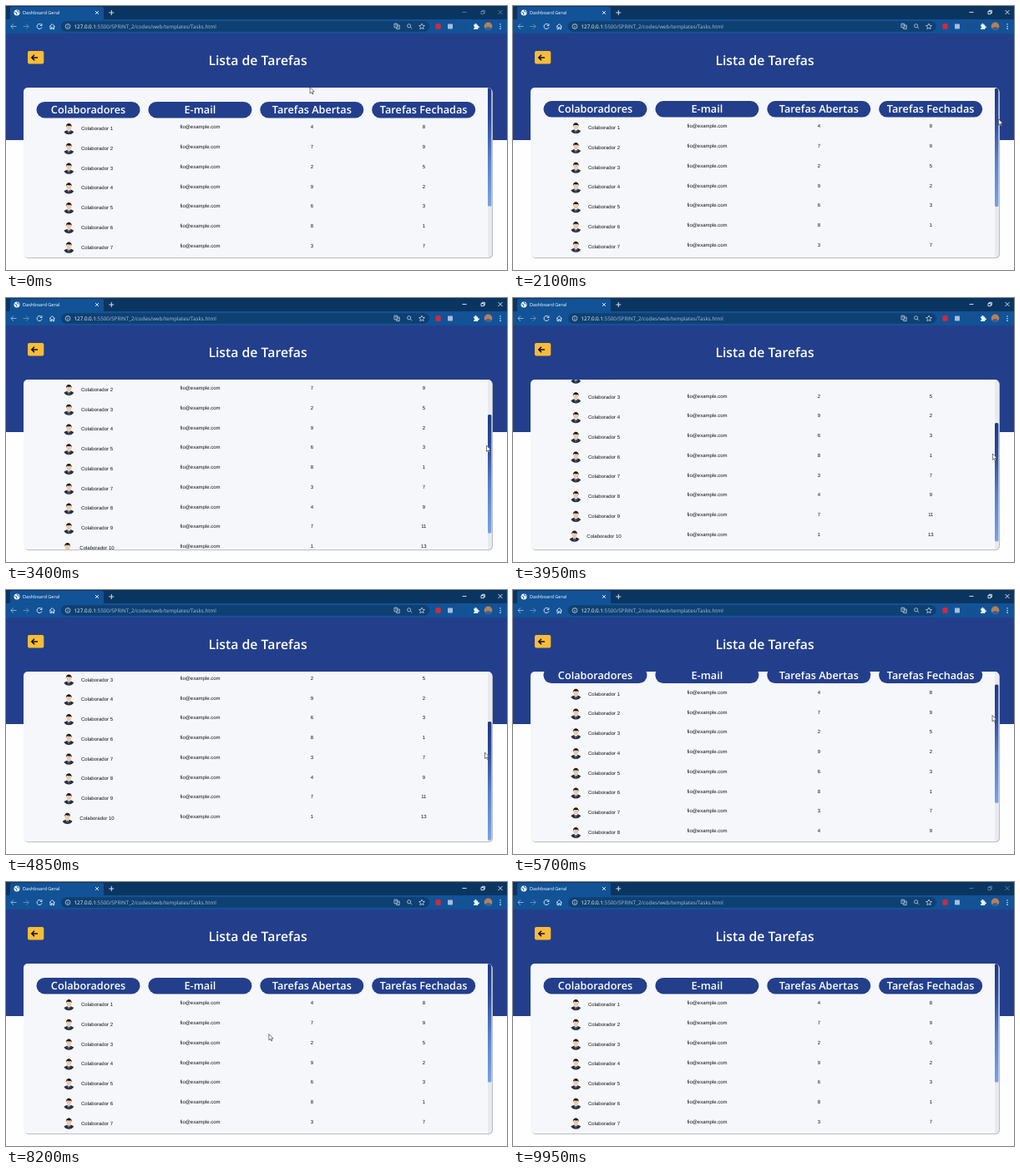
An HTML page for the animation above (10 s loop, 600x317 px).

```html
<!DOCTYPE html>
<html lang="pt">
<head>
<meta charset="utf-8">
<title>Lista de Tarefas</title>
<style>
  html, body { margin: 0; height: 100%; overflow: hidden; background: #fefefe; }
  svg { display: block; width: 600px; height: 317px; text-rendering: geometricPrecision; }
  .ui { font-family: "Open Sans", sans-serif; fill: #fff; }
  .head { font-size: 12.7px; font-weight: 600; text-anchor: middle; }
  .cell { font: 6px "Liberation Sans", Arial, sans-serif; fill: #101216; }
  .mid { text-anchor: middle; }
  .line { fill: none; stroke: #e6eef7; stroke-width: .9; }
</style>
</head>
<body>
<svg viewBox="0 0 600 317">
  <defs>
    <linearGradient id="thumbFill" x2="0" y2="1">
      <stop stop-color="#1f3a88"/>
      <stop offset=".25" stop-color="#284a9b"/>
      <stop offset=".6" stop-color="#5580cb"/>
      <stop offset="1" stop-color="#78a3e4"/>
    </linearGradient>
    <clipPath id="cardClip"><rect x="21" y="98" width="561" height="204" rx="5"/></clipPath>
    <g id="avatar">
      <path d="M-5.9 3.6Q-4.4 2.2-1.6 1.5h3.2Q4.4 2.2 5.9 3.6Q3.8 6.8 0 6.8T-5.9 3.6z" fill="#26303f"/>
      <path d="M-1.9 1.4L0 6.2 1.9 1.4z" fill="#fff"/>
      <path d="M-.5 2.4h1L.8 4.6 0 6-.8 4.6z" fill="#34405a"/>
      <ellipse cy="-1.8" rx="2.8" ry="3.6" fill="#f3c9a2"/>
      <path d="M-3.3-1.8C-4.3-7.8 4.3-7.8 3.3-1.8L2.5-3.6Q0-3.2-2.5-3.8z" fill="#1d1b1e"/>
    </g>
  </defs>

  <!-- browser bar -->
  <rect width="600" height="17" fill="#0b3561"/>
  <path d="M3 17Q5 17 5 14V3Q5 1 7 1H115Q117 1 117 3V14Q117 17 119 17z" fill="#125297"/>
  <rect y="16" width="600" height="17.5" fill="#125297"/>
  <rect x="66" y="18.3" width="441" height="12.4" rx="6.2" fill="#0f4072"/>
  <circle cx="13" cy="8" r="3.5" fill="#f1f5fa"/>
  <path d="M10.5 7l2 1 .3 2.3M13.5 5l.3 1.6 2 .6" class="line" style="stroke:#125297"/>
  <text x="20" y="10.1" class="ui" font-size="5.6">Dashboard Geral</text>
  <path class="line" d="M107 6l4 4m0-4l-4 4M123.3 8h6M126.3 5v6"/>
  <g id="windowButtons" class="line">
    <path d="M546.5 7.5h5M569 6.5h3.2v3.2H569zM570.2 6.5V5.3h3.2v3.2h-1.2M589.5 5l5 5m0-5l-5 5"/>
  </g>
  <path class="line" opacity=".65" d="M12.5 24.5h-6.5M9 21.4l-3.1 3.1L9 27.6"/>
  <path class="line" opacity=".4" d="M20.5 24.5h6.5M24 21.4l3.1 3.1L24 27.6"/>
  <path class="line" d="M52 24.7l3.3-3 3.3 3M53 24v3.7h1.6v-2h1.4v2h1.6V24"/>
  <path class="line" d="M42.4 22.6A3 3 0 1 0 43 25.3M43 21.3v2.2h-2.3"/>
  <circle class="line" cx="74" cy="24.5" r="2.9" style="stroke-width:.7"/>
  <path class="line" d="M74 24.1v2.1M74 22.5v.8" style="stroke-width:.7"/>
  <text x="81.5" y="26.6" class="ui" font-size="6.25">127.0.0.1<tspan fill="#a9bfd6">:5500/SPRINT_2/codes/web/templates/Tasks.html</tspan></text>
  <g class="line" style="stroke:#c6d5e5;stroke-width:.8">
    <path d="M465 21.2h3.6v4.6H465zM468.6 23h2.6v4.6h-3.4l-.5-1.8M466 23h1.6M469.4 25h1"/>
    <circle cx="482.7" cy="23.8" r="2.1"/>
    <path d="M484.3 25.4l1.8 1.8M498 21.1l1 2.2 2.4.3-1.8 1.6.5 2.4-2.1-1.2-2.1 1.2.5-2.4-1.8-1.6 2.4-.3z"/>
  </g>
  <rect x="514.4" y="21.2" width="6.2" height="6.6" rx="1" fill="#d5293b"/>
  <rect x="529" y="21.5" width="6" height="6" rx=".8" fill="#a9bbd8"/>
  <circle cx="547" cy="24.5" r="2.8" fill="#1d4f86"/>
  <path d="M560 22.6h1.6a1.1 1.1 0 1 1 1.8 0h1.8v1.8a1.1 1.1 0 1 1 0 1.8v1.8H560v-1.7a1 1 0 1 0 0-1.9z" fill="#f1f5fa"/>
  <circle cx="577.5" cy="24.3" r="4.8" fill="#b98052"/>
  <path d="M573.5 27a4.6 4.6 0 0 0 8 0q-4-4-8 0z" fill="#34619a"/>
  <path d="M592 21.2v1.3m0 1.4v1.3m0 1.4v1.3" stroke="#e6eef7" stroke-width="1.3"/>

  <!-- page -->
  <rect y="33" width="600" height="128" fill="#233f8c"/>
  <rect x="26" y="54" width="19.3" height="15.4" rx="2" fill="#f8bc37"/>
  <path d="M38 61.9h-7M34 58.7l-3.2 3.2 3.2 3.2" fill="none" stroke="#111" stroke-width="1.5"/>
  <text x="301.5" y="70.6" class="ui head" style="font-size:15.8px">Lista de Tarefas</text>
  <rect x="22" y="99" width="561" height="204" rx="5" fill="#b9bcc4"/>
  <rect x="21" y="98" width="561" height="204" rx="5" fill="#f6f7fb"/>
  <g clip-path="url(#cardClip)">
    <g id="content"></g>
    <rect x="577" y="98" width="5" height="204" fill="#e9eaee"/>
    <rect id="thumb" x="577" y="98" width="4.4" height="142.4" rx="1.5" fill="url(#thumbFill)"/>
  </g>
  <path id="cursor" d="M0 0V7.4L1.7 5.9 2.8 8.4 4 7.9 2.9 5.4H5.2z" fill="#fff" stroke="#222" stroke-width=".6"/>
</svg>
<script>
const LOOP = 10000, GRAB = 2050, RELEASE = 6400, BLUR = 9600;
const THUMB_HOME = 135, THUMB_TRAVEL = 60, SCROLL_RATIO = 1.45;
const $ = id => document.getElementById(id);

const headings = ["Colaboradores", "E-mail", "Tarefas Abertas", "Tarefas Fechadas"];
const open = [4, 7, 2, 9, 6, 8, 3, 4, 7, 1];
const closed = [8, 9, 5, 2, 3, 1, 7, 9, 11, 13];

const pills = headings.map((label, i) => {
  const x = 36.5 + i * 133.9;
  return `<rect x="${x}" y="115" width="124" height="19.4" rx="9.7" fill="#233f8c"/>
    <text x="${x + 62}" y="129" class="ui head">${label}</text>`;
});
const rows = open.map((count, i) => {
  const y = 147.4 + i * 23.75, shift = i === 9 ? -1.7 : 0;
  const cell = (x, text) => `<text x="${x}" y="${y}" class="cell mid">${text}</text>`;
  return `<use href="#avatar" x="${75.3 + shift}" y="${y}"/>
    <text x="${90 + shift}" y="${y + 1.7}" class="cell">Colaborador ${i + 1}</text>` +
    cell(232.5, "fio@example.com") + cell(366.3, count) + cell(500.3, closed[i]);
});
$("content").innerHTML = pills.concat(rows).join("");

// pointer path: time, x, y
const path = [
  [0, 364, 97.5], [250, 364, 97.5], [1050, 560, 124], [1800, 581, 134], [2050, 581.5, 135],
  [2100, 581.5, 135.6], [3400, 575.5, 177], [4400, 573.5, 195], [5000, 573.5, 195],
  [5700, 574, 150.5], [6100, 574, 134], [6700, 574, 133.5], [7500, 420, 165],
  [8300, 300, 185], [9300, 330, 200], [LOOP, 330, 200]
];

function pointerAt(t) {
  const i = path.findIndex(p => p[0] > t);
  const [t0, x0, y0] = path[i - 1], [t1, x1, y1] = path[i];
  const k = (t - t0) / (t1 - t0);
  return [x0 + (x1 - x0) * k, y0 + (y1 - y0) * k];
}

function draw() {
  const t = performance.now() % LOOP;
  const [x, y] = pointerAt(t);
  const dragging = t >= GRAB && t < RELEASE;
  const drag = dragging ? Math.min(THUMB_TRAVEL, Math.max(0, y - THUMB_HOME)) : 0;
  $("cursor").setAttribute("transform", `translate(${x} ${y})`);
  $("cursor").style.opacity = t < BLUR ? 1 : 0;
  $("thumb").setAttribute("transform", `translate(0 ${drag})`);
  $("content").setAttribute("transform", `translate(0 ${-drag * SCROLL_RATIO})`);
  $("windowButtons").style.opacity = t >= GRAB && t < BLUR ? 1 : .4;
  requestAnimationFrame(draw);
}
draw();
</script>
</body>
</html>
```
